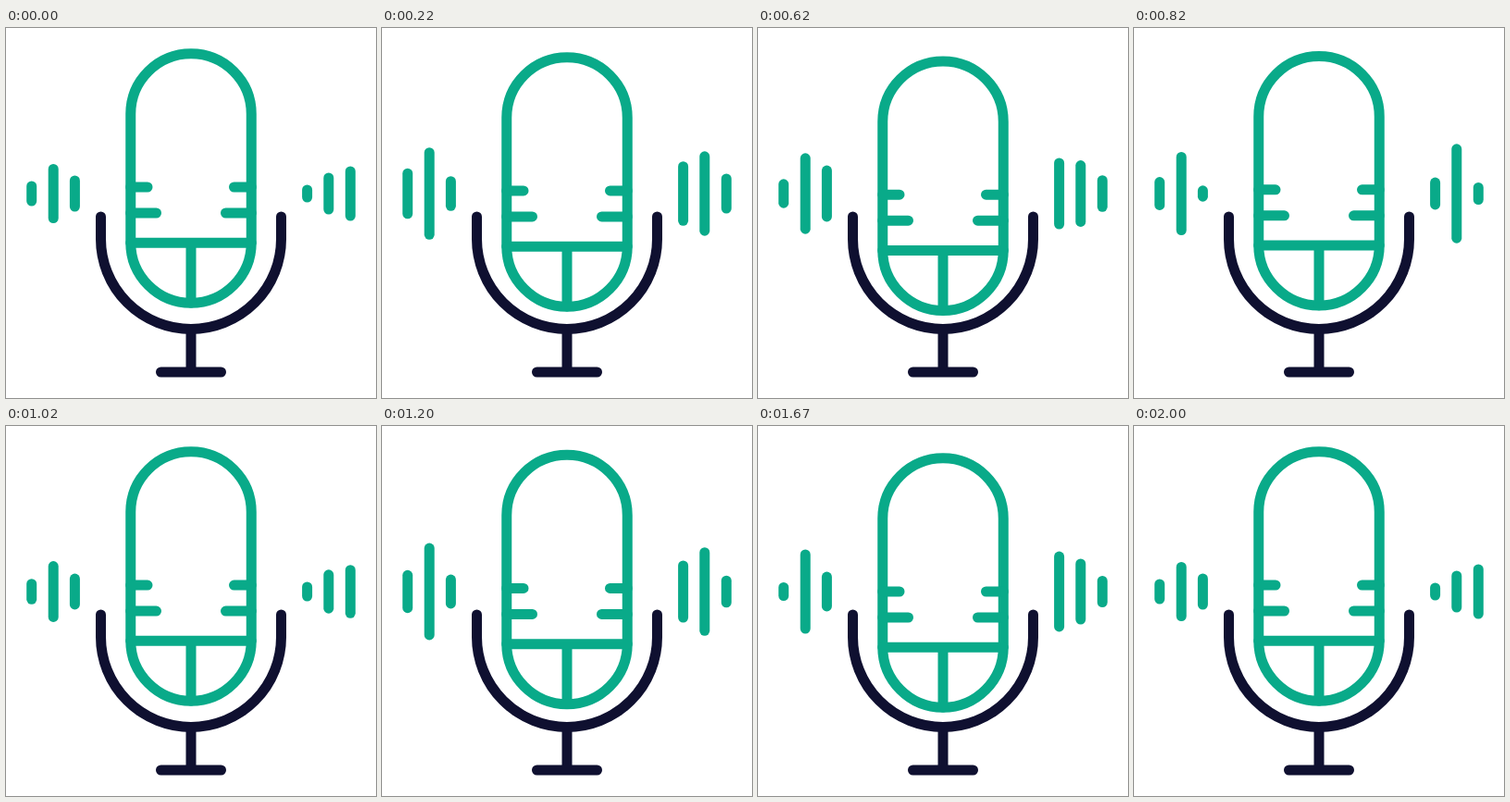
These frames come from a looping animation (400 by 400 pixels, 2.02 s). An HTML page:

```html
<!DOCTYPE html>
<html lang="en">
<head>
<meta charset="utf-8">
<title>Microphone</title>
<style>
  html, body { margin: 0; width: 100%; height: 100%; overflow: hidden; background: #fff; }
  svg { display: block; width: 100%; height: 100%; }
  path { fill: none; stroke-width: 11; stroke-linecap: round; stroke-linejoin: round; }
  .green { stroke: #09aa89; }
  .navy { stroke: #0f1030; }
</style>
</head>
<body>
<svg viewBox="0 0 400 400">
  <path class="navy" d="M102.5 204V228A97.5 97.5 0 0 0 297.5 228V204M200 325.5V372M167.5 372H232.5"/>
  <g id="mic">
    <path class="green" d="M134.75 93A65.25 65.25 0 0 1 265.25 93V232A65.25 65.25 0 0 1 134.75 232Z"/>
    <path class="green" d="M134.75 232.3H265.25M200 232.3V297
      M134.75 172H153M134.75 200H162.5M265.25 172H246.5M265.25 200H237.5"/>
  </g>
  <g id="bars"></g>
</svg>
<script>
  const LOOP = 2020, CYCLE = 1000, MIDDLE = 179, WIDTH = 11, TRAVEL = 9.6;

  // Overall bar heights at evenly spaced moments of one cycle.
  const bars = [
    { x: 27.7, heights: [27, 40, 98, 82, 20, 36] },
    { x: 51.2, heights: [64, 109, 71, 71, 91, 90] },
    { x: 74.4, heights: [39, 36, 43, 140, 43, 17] },
    { x: 325.6, heights: [19, 65, 84, 33, 87, 34] },
    { x: 348.8, heights: [45, 99, 68, 76, 71, 108] },
    { x: 372.3, heights: [59, 28, 88, 64, 34, 24] }
  ];

  const mic = document.getElementById('mic');
  const barGroup = document.getElementById('bars');
  for (const bar of bars) {
    bar.path = document.createElementNS('http://www.w3.org/2000/svg', 'path');
    bar.path.setAttribute('class', 'green');
    barGroup.append(bar.path);
  }

  const ease = u => u * u * (3 - 2 * u);

  function sample(values, phase) {
    const position = phase * values.length;
    const i = Math.floor(position);
    const from = values[i], to = values[(i + 1) % values.length];
    return from + (to - from) * ease(position - i);
  }

  function draw(time) {
    const phase = Math.min(time % LOOP, 2 * CYCLE) % CYCLE / CYCLE;
    const dip = TRAVEL * ease(1 - Math.abs(1 - 2 * phase));
    mic.setAttribute('transform', `translate(0 ${dip})`);
    for (const { x, heights, path } of bars) {
      const half = (sample(heights, phase) - WIDTH) / 2;
      path.setAttribute('d', `M${x} ${MIDDLE - half}V${MIDDLE + half}`);
    }
  }

  const start = performance.now();
  function tick(now) {
    draw(Math.max(0, now - start));
    requestAnimationFrame(tick);
  }
  draw(0);
  requestAnimationFrame(tick);
</script>
</body>
</html>
```
